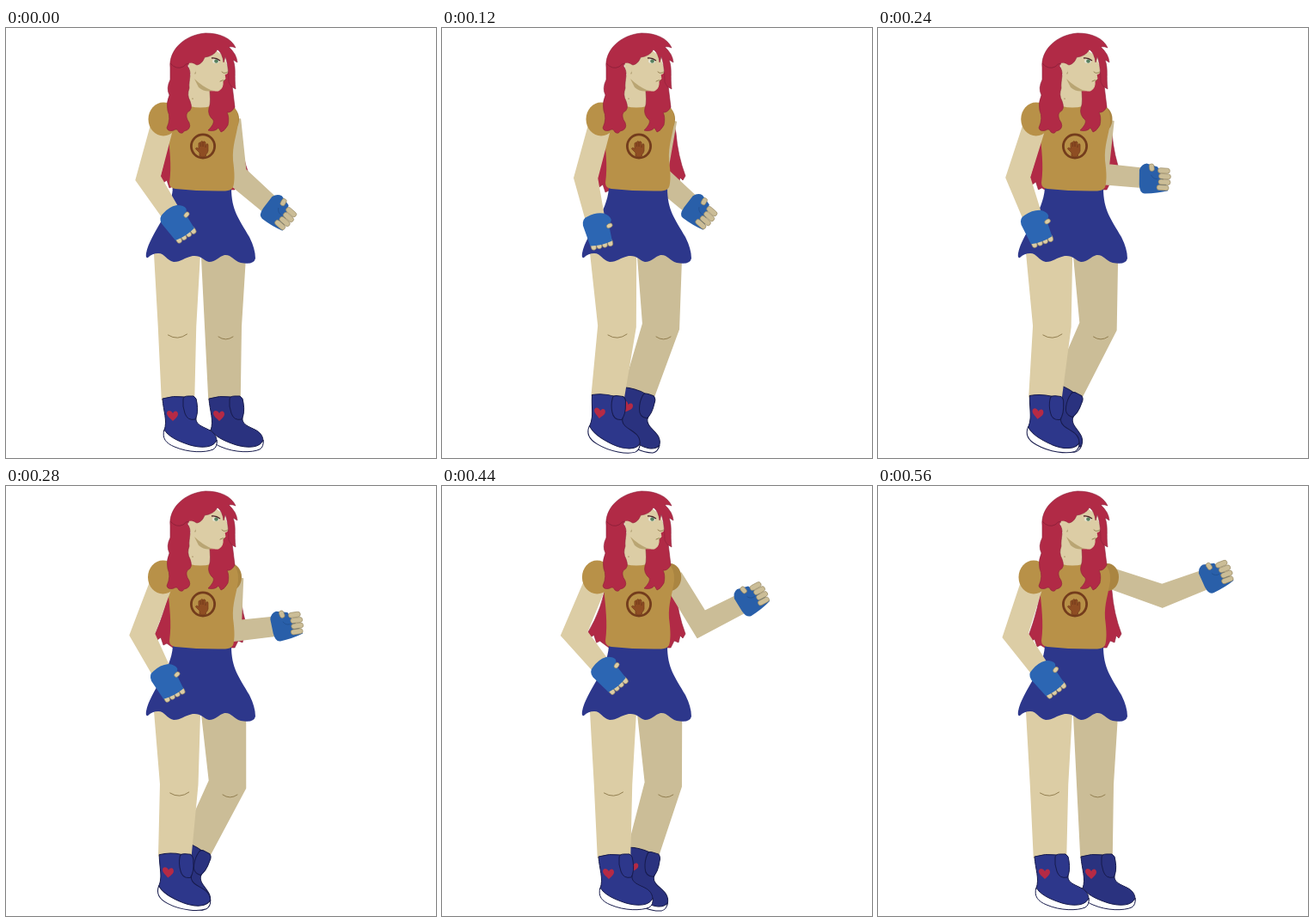
An HTML page for the animation above (0.6 s loop, 500 px wide and 500 px high).

```html
<!DOCTYPE html>
<html lang="en">
<head>
<meta charset="utf-8">
<title>Punch</title>
<style>
  html, body { margin: 0; width: 100%; height: 100%; overflow: hidden; background: #fff; }
  svg { display: block; width: 100%; height: 100%; }
  .skin { fill: #dccda5; stroke: #dccda5; }
  .shade { fill: #cbbd97; stroke: #cbbd97; }
  .shirt { fill: #b89148; }
  .hair { fill: #b12a46; stroke: #8d2039; stroke-width: .6; stroke-linejoin: round; }
  .line { fill: none; stroke: #8b7748; stroke-width: .9; stroke-linecap: round; }
  .limb { stroke-width: 1.5; stroke-linejoin: round; }
  .finger { stroke: #92835c; stroke-width: .6; }
</style>
</head>
<body>
<svg viewBox="0 0 500 500">
  <defs>
    <g id="boot" stroke="#171b4c" stroke-width="1" stroke-linejoin="round">
      <path fill="currentColor" d="M182 431Q194 427 208 429L221 440V456C224 467 244 464 245 480C246 489 232 491 215 486C199 481 184 473 184 468C188 456 183 446 182 431Z"/>
      <path fill="#fff" d="M184 467C181 477 186 483 196 487C212 494 232 494 241 490Q246 487 245 479C242 488 228 489 214 485C198 480 188 474 184 467Z"/>
      <path fill="currentColor" d="M206 432Q206 428 212 428H218Q222 430 222 436Q224 448 220 455Q211 457 208 448Q205 440 206 432Z"/>
      <path fill="#b52a45" stroke="none" d="M194 457C190 453 187 451 187 448C187 444 192 444 194 448C196 444 200 445 200 449C200 452 197 454 194 457Z"/>
    </g>
  </defs>

  <path id="backHair" class="hair"/>

  <path id="farArm" class="shade limb"/>
  <g id="farHand">
    <path fill="#295fa9" d="M-29-9Q-27-16-21-17L-8-14L-5-8L3 6L6 13Q-6 17-21 18Q-27 18-28 8Z"/>
    <path fill="none" stroke="#1f4b88" stroke-width=".6" d="M-15-4Q-12 1-7 0"/>
    <g class="shade finger" id="farFingers"><rect x="-17.500" y="-17" width="5.600" height="8.500" rx="2.600" transform="rotate(-12 -14.500 -12)"/></g>
  </g>
  <ellipse id="farSleeve" fill="#aa8541" cy="106" rx="13" ry="16"/>

  <path id="farLeg" class="shade limb"/>
  <path id="farKnee" class="line" d="M-8.500 359Q0 365 8.500 359"/>
  <use id="farBoot" href="#boot" color="#2a327f"/>
  <path id="nearLeg" class="skin limb"/>
  <path id="nearKnee" class="line" d="M-11 357Q0 364 11 356"/>
  <use id="nearBoot" href="#boot" color="#2d378b"/>

  <path fill="#2d378b" d="M194 186H262C262 212 271 222 283 243Q290 257 290 268Q288 276 273 273C264 270 262 263 254 264C247 266 244 272 236 272C229 270 227 264 217 265C207 267 204 272 195 272C186 270 185 262 177 262Q170 262 165 267Q162 268 163 262C168 238 192 216 194 186Z"/>

  <path class="skin" d="M210 55H238V92Q226 101 210 94Z"/>
  <path class="shirt" d="M188 92L214 91Q226 94 238 91L262 89Q271 96 270 110C268 126 263 136 264 154Q267 176 264 185Q262 189 255 189.500Q225 190 197 187Q190 186 190 180C193 160 190 140 188 118Z"/>
  <g stroke="#733c1c">
    <circle cx="229" cy="137.500" r="13.600" fill="#b89148" stroke-width="2.800"/>
    <path fill="#8e4d23" stroke-width=".7" stroke-linejoin="round" d="M225 149V145L220.500 140.500Q221 138 224 140.500V134Q225.500 132 226.500 134V138V132.500Q228 130.500 229 132.500V138V132.500Q231 131 232 133V139L233 135Q235 134 235 136V143Q234 146 232.500 147V149Q229 151 225 149Z"/>
  </g>

  <path id="nearArm" class="skin limb"/>
  <ellipse id="nearSleeve" class="shirt" cy="106" rx="17.500" ry="19.500"/>
  <g id="nearHand">
    <g class="skin finger" id="nearFingers"></g>
    <path fill="#2c66b3" d="M-15.500-25Q-15-33-8-34Q2-37 11-33.500Q18-29 18-24L14-17L13.500 0Q0 3-12.600 0Z"/>
    <ellipse class="skin finger" cx="14.500" cy="-18" rx="3.600" ry="2.500" transform="rotate(-15 14.500 -18)"/>
  </g>

  <path class="hair" d="M236 66L261 50L266 92Q262 99 257 98Q260 104 258 113Q254 120 250 121L247 116Q243 121 235 119Q243 111 241 107Q234 101 236 93Q239 86 236 66Z"/>
  <path class="skin" stroke="none" d="M212 38Q214 20 238 22L254 34C255 42 259 46 258 51Q257 54 254 54L255 59L252 62Q253 70 247 73Q239 74 232 70Q219 63 214 52Z"/>
  <path fill="#b9a573" d="M219 59Q228 68 240 73Q231 75 224 69Z"/>
  <path class="line" d="M258 51Q254 54 251 51M249 62Q252 60 254 61M216 44Q221 47 220 53M217 82V82.500"/>
  <path class="hair" d="M191 46C189 26 207 8 232 6C249 6 262 12 267 23Q263 21 259 22Q268 30 269 40L264 37C268 48 265 56 267 71L262 68L259 63Q259 44 255 33L253 40Q252 30 246 25Q241 33 231 34Q228 42 222 43Q214 38 211 44C217 52 212 60 213 70Q210 78 214 85Q218 95 211 98Q208 103 213 110Q216 118 207 120Q205 124 201 121Q199 116 195 119Q188 121 187 116Q192 105 188 96Q186 87 190 78Q186 70 191 60Z"/>
  <path fill="none" stroke="#8d2039" stroke-width=".9" d="M191 41Q198 49 206 45Q209 41 214 41"/>
  <path class="skin" d="M213 41Q220 40 221 47Q221 53 217 53Q213 49 213 41Z" stroke="#a99462" stroke-width=".6"/>
  <ellipse cx="244" cy="38.500" rx="4" ry="2.600" fill="#e7e6d5"/>
  <circle cx="244.500" cy="38.500" r="2.300" fill="#57805f"/>
  <path fill="none" stroke="#4a2328" stroke-width="1.300" d="M239 35Q244 34 249 38"/>
</svg>
<script>
const STEP = 40, LOOP = 600, RAD = Math.PI / 180;

const el = {};
document.querySelectorAll('svg [id]').forEach(e => el[e.id] = e);
const set = (id, name, value) => el[id].setAttribute(name, value);

function addFingers(id, place) {
  for (let i = 0; i < 4; i++) {
    const f = document.createElementNS('http://www.w3.org/2000/svg', 'rect');
    for (const [k, v] of Object.entries(place(i))) f.setAttribute(k, v);
    el[id].append(f);
  }
}
addFingers('farFingers', i => ({ x: i % 3 ? -6 : -7.5, y: -13 + i * 6.6, width: 14, height: 6, rx: 3 }));
addFingers('nearFingers', i => ({ x: -12 + i * 6.6, y: -3, width: 6, height: 8.6, rx: 3 }));

const ramp = (t, from, to) => Math.min(1, Math.max(0, (t - from) / (to - from)));
const reach = ([x, y], deg, len) => [x + Math.cos(deg * RAD) * len, y + Math.sin(deg * RAD) * len];

// Outline of a two-bone limb with a mitred joint
function limb(a, b, c, [wa, wb, wc]) {
  const u = Math.atan2(b[1] - a[1], b[0] - a[0]);
  const v = Math.atan2(c[1] - b[1], c[0] - b[0]);
  const turn = Math.atan2(Math.sin(v - u), Math.cos(v - u));
  const inner = Math.min(1.8, 1 / Math.cos(turn / 2)), outer = Math.min(1.2, inner);
  const [right, left] = turn > 0 ? [inner, outer] : [outer, inner];
  const mid = u + turn / 2;
  const off = (p, ang, d) =>
    (p[0] - Math.sin(ang) * d).toFixed(2) + ' ' + (p[1] + Math.cos(ang) * d).toFixed(2);
  return 'M' + [
    off(a, u, wa / 2), off(b, mid, wb / 2 * right), off(c, v, wc / 2),
    off(c, v, -wc / 2), off(b, mid, -wb / 2 * left), off(a, u, -wa / 2)
  ].join('L') + 'Z';
}

function drawArm(side, shoulder, upper, fore, [upperLen, foreLen], grip, widths) {
  const elbow = reach(shoulder, upper, upperLen);
  const hand = reach(elbow, fore, foreLen);
  set(side + 'Arm', 'd', limb(shoulder, elbow, reach(hand, fore, -28), widths));
  set(side + 'Hand', 'transform', `translate(${hand}) rotate(${fore + grip})`);
}

function drawLeg(side, hip, knee, [ax, ay], rot, kneeShift, widths) {
  set(side + 'Leg', 'd', limb(hip, [knee, 347], [ax, ay + 2], widths));
  set(side + 'Knee', 'transform', `translate(${knee + kneeShift} 0)`);
  set(side + 'Boot', 'transform', `translate(${ax - 200} ${ay - 430}) rotate(${rot} 200 430)`);
}

function draw(t) {
  const wind = ramp(t, 0, 120), raise = ramp(t, 120, 360);
  const guard = ramp(t, 200, 360), punch = ramp(t, 360, 560);
  const lift = ramp(t, 0, 160) - punch, lean = wind - guard;

  const farX = 261 + 6 * guard + 3 * punch;
  drawArm('far', [farX, 107], 85 + 16 * wind - 15 * guard - 67 * punch,
    41 - 74 * raise + 12 * punch, [64, 78], 0, [23, 25, 22]);
  set('farSleeve', 'cx', farX - 3);

  const nearX = 183 + 2 * wind - 5 * guard + punch;
  drawArm('near', [nearX, 108], 105 + 11 * guard - 8 * punch,
    57 + 20 * wind - 29 * guard + 6 * punch, [69, 78], -90, [25, 26, 21]);
  set('nearSleeve', 'cx', nearX);

  drawLeg('far', [253, 262], 252.5 + 2 * wind + 6 * guard - 8 * punch,
    [254 - 34 * lift, 430 - 9 * lift], 28 * lift, 3, [51, 41.5, 36]);
  drawLeg('near', [199, 258], 199 + 4.5 * lean,
    [200 - 7.5 * lean, 430 - 2 * lean], 8 * lean, 0.5, [53, 43, 37]);

  const hairX = 179 - 14 * guard + 9 * punch, hairY = 176 + 5 * wind - 12 * guard + 8 * punch;
  set('backHair', 'd', `M200 70L190 112Q188 140 ${hairX} ${hairY}l4 4l4 -3l3 9l4 -2L194 188H266` +
    'L270 180L275 182L277 174L280 177L283 172Q274 148 272 122L263 80Z');
}

function frame(now) {
  draw(Math.floor(now % LOOP / STEP) * STEP);
  requestAnimationFrame(frame);
}
draw(0);
requestAnimationFrame(frame);
</script>
</body>
</html>
```
